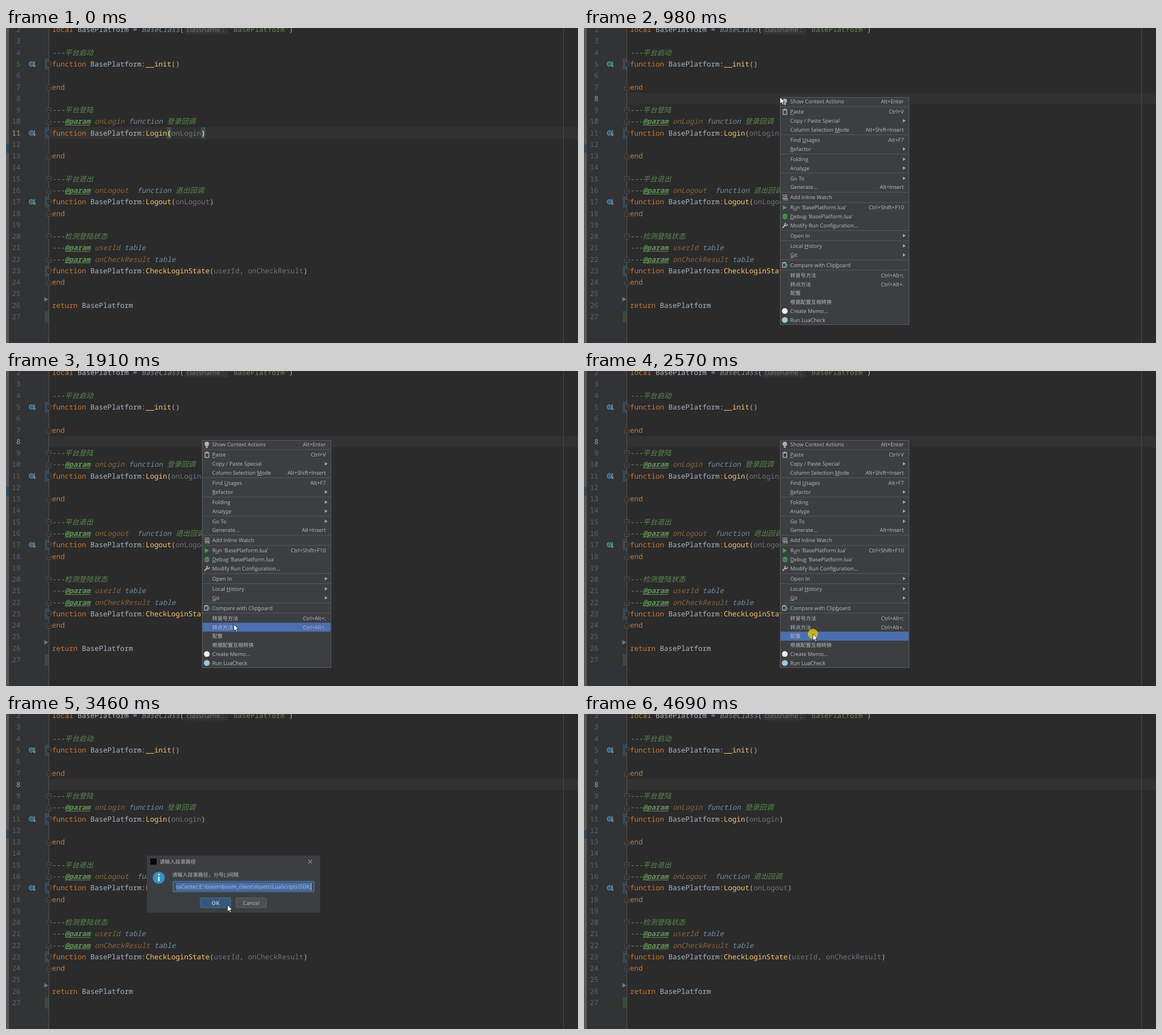
Recreate the animation shown at these times as an HTML page with a canvas. Size 1007 by 556 pixels, loop 5220 ms.

```html
<!DOCTYPE html>
<html lang="zh">
<head>
<meta charset="utf-8">
<style>
html, body { margin: 0; height: 100%; overflow: hidden; background: #2b2b2b; }
canvas { display: block; }
</style>
</head>
<body>
<canvas id="stage" width="1007" height="556"></canvas>
<script>
const c = document.getElementById('stage').getContext('2d');
const LOOP = 5220, COL = 7.5, ROW = 20.27;
const CJK = '"Noto Sans CJK SC", "Noto Sans CJK"';
const MONO = `12.5px "Noto Sans Mono", ${CJK}, monospace`;
const ui = (size = 9.4, weight = '') => `${weight} ${size}px "Open Sans", ${CJK}, sans-serif`;

// style letter: colour, font prefix
const STYLES = {
  k: ['#cc7832', ''], t: ['#a9b7c6', ''], f: ['#ffc66d', ''], p: ['#72737a', ''],
  c: ['#629755', 'italic '], z: ['#5b8a50', 'italic 300 '], a: ['#629755', 'italic bold '],
  n: ['#8a653b', 'italic '], y: ['#748ca3', 'italic '], i: ['#8290a0', 'italic '], s: ['#6a8759', '']
};
const METHOD = 'kfunction |tBasePlatform:|f';
const NOTE = 'c---|z';
const PARAM = 'c---|a@param|n ';
const CODE = {
  2: 'klocal |tBasePlatform = |iBaseClass|t(',
  4: NOTE + '平台启动', 5: METHOD + '__init|t()', 7: 'kend',
  9: NOTE + '平台登陆', 10: PARAM + 'onLogin |yfunction |z登录回调',
  11: METHOD + 'Login|t(|ponLogin|t)', 13: 'kend',
  15: NOTE + '平台退出', 16: PARAM + 'onLogout  |yfunction |z退出回调',
  17: METHOD + 'Logout|t(|ponLogout|t)', 18: 'kend',
  20: NOTE + '检测登陆状态', 21: PARAM + 'userId |ytable', 22: PARAM + 'onCheckResult |ytable',
  23: METHOD + 'CheckLoginState|t(|puserId|k, |ponCheckResult|t)', 24: 'kend',
  26: 'kreturn |tBasePlatform'
};

// "-" opens a new group, "&" marks the underlined letter, ">" a submenu
let menuY = 130;
const MENU = `Show Context Actions|Alt+Enter
-&Paste|Ctrl+V
Copy / Paste Special|>
Column Selection &Mode|Alt+Shift+Insert
-Find &Usages|Alt+F7
&Refactor|>
-Folding|>
Analy&ze|>
-Go To|>
Generate...|Alt+Insert
-Add Inline Watch|
-R&un 'BasePlatform.lua'|Ctrl+Shift+F10
&Debug 'BasePlatform.lua'|
Modify Run Configuration...|
-Open In|>
-Local &History|>
&Git|>
-Compare with Clip&board|
-转冒号方法|Ctrl+Alt+;
转点方法|Ctrl+Alt+.
配置|
根据配置互相转换|
Create Memo...|
Run LuaCheck|`.split('\n').map((row, i) => {
  const group = row[0] === '-';
  const [label, key] = row.slice(group ? 1 : 0).split('|');
  if (i) menuY += 15.8 + (group ? 2.2 : 0);
  return { label, key, group, y: menuY };
});

// mouse tip: time, x, y
const MOUSE = [
  [70, 944, 532], [140, 850, 452], [210, 705, 340], [280, 565, 235], [350, 455, 162],
  [420, 385, 128], [485, 352, 117], [550, 345, 122], [1375, 345, 122], [1440, 347, 160],
  [1510, 355, 250], [1578, 364, 316], [1640, 370, 335], [1710, 379, 372], [1780, 390, 412],
  [1850, 398, 445], [1910, 401, 447], [1980, 402, 455], [2045, 403, 462], [2110, 403, 464],
  [2640, 403, 464], [2710, 410, 463], [2850, 421, 460], [3040, 421, 460], [3110, 419, 446],
  [3250, 406, 390], [3390, 392, 345], [3460, 390, 337], [4062, 390, 337], [4130, 425, 350],
  [4200, 560, 388], [4268, 720, 428], [4336, 860, 460], [4404, 931, 474]
];
const HOVER_LAG = 60;

function box(x, y, w, h, fill) { c.fillStyle = fill; c.fillRect(x, y, w, h); }

function text(str, x, y, fill, font, align = 'left') {
  c.font = font; c.fillStyle = fill; c.textAlign = align;
  c.fillText(str, x, y);
}

function shape(points, fill, stroke, width = 1, open = false) {
  c.beginPath();
  points.forEach(([x, y]) => c.lineTo(x, y));
  if (!open) c.closePath();
  if (fill) { c.fillStyle = fill; c.fill(); }
  if (stroke) { c.strokeStyle = stroke; c.lineWidth = width; c.stroke(); }
}

function line(x1, y1, x2, y2, color, width = 1) {
  shape([[x1, y1], [x2, y2]], null, color, width, true);
}

function disc(x, y, r, fill, stroke, width = 1) {
  c.beginPath(); c.arc(x, y, r, 0, 7);
  if (fill) { c.fillStyle = fill; c.fill(); }
  if (stroke) { c.strokeStyle = stroke; c.lineWidth = width; c.stroke(); }
}

function panel(x, y, w, h, r, fill, stroke, width = 1) {
  c.beginPath(); c.roundRect(x, y, w, h, r);
  c.fillStyle = fill; c.fill();
  c.strokeStyle = stroke; c.lineWidth = width; c.stroke();
}

const rowY = n => 63.6 + (n - 5) * ROW;

function codeLine(n) {
  const base = rowY(n) + 4.4;
  let x = 81;
  for (const token of CODE[n].split('|')) {
    const [color, prefix] = STYLES[token[0]], str = token.slice(1);
    text(str, x, base, color, prefix + MONO);
    if (token[0] === 'a') line(x, base + 2, x + str.length * COL, base + 2, color);
    x += str.length * COL;
  }
}

function fold(n, dir) {
  const y = rowY(n) + 0.7, w = 4;
  shape([[75.5 - w, y - 4.5 * dir], [75.5 + w, y - 4.5 * dir], [75.5 + w, y + 1.5 * dir],
    [75.5, y + 5 * dir], [75.5 - w, y + 1.5 * dir]], '#2b2b2b', '#5c5e60', 0.8);
  line(73.5, y - 0.7 * dir, 77.5, y - 0.7 * dir, '#6a6c6e', 0.8);
}

function overrideIcon(n) {
  const y = rowY(n);
  disc(44.6, y, 4.6, '#3f8fb8');
  disc(44.6, y, 2.1, '#3f8fb8', '#28373f', 1.2);
  line(50, y - 5, 50, y + 4.5, '#b4b8ba');
  shape([[47.8, y + 2.5], [50, y + 5], [52.2, y + 2.5]], null, '#b4b8ba', 1, true);
}

function editor(current, caret) {
  box(0, 0, 1007, 556, '#2b2b2b');
  box(5, 0, 71, 556, '#313335');
  box(0, 0, 5, 556, '#555759');
  box(0, 205, 5, 15, '#34495a');
  box(76, rowY(current) - 10, 931, ROW, '#323232');
  line(981.5, 0, 981.5, 556, '#484848');
  for (const n of [5, 11, 17, 23]) box(68, rowY(n) - 10, 8, ROW, '#374752');
  box(68, rowY(27) - 10, 8, ROW, '#384c38');
  line(75.5, 0, 75.5, 556, '#555555');

  for (let n = 2; n <= 27; n++) {
    text(n, 25.5, rowY(n) + 4.4, n === current ? '#a4a3a3' : '#606366', MONO, 'right');
    if (CODE[n]) codeLine(n);
  }
  panel(315, -8, 76, 19, 2, '#343434', '#343434');
  text('classname :', 318, 7, '#787878', ui(12.1));
  text('"BasePlatform"', 393, rowY(2) + 4.4, STYLES.s[0], MONO);
  text(')', 498, rowY(2) + 4.4, STYLES.t[0], MONO);

  [5, 9, 11, 15, 17, 20, 23].forEach(n => fold(n, 1));
  [7, 10, 13, 16, 18, 22, 24].forEach(n => fold(n, -1));
  [5, 11, 17].forEach(overrideIcon);
  shape([[67.5, 475], [74.5, 479], [67.5, 483]], '#76797b');

  if (current === 11) {
    for (const [ch, col] of [['(', 27], [')', 35]]) {
      box(81 + col * COL, rowY(11) - 10, COL, ROW, '#3b514d');
      text(ch, 81 + col * COL, rowY(11) + 4.4, '#ffef28', 'bold ' + MONO);
    }
  }
  if (caret) box(80.5, 116.5, 1.2, 16, '#bbbbbb');
}

function menuIcons() {
  const g = '#afb1b3', green = '#499c54', y = i => MENU[i].y;
  disc(353.5, y(0) - 1.2, 4, g);
  box(351.7, y(0) + 3, 3.6, 2.6, g);

  c.strokeStyle = g; c.lineWidth = 1.4;
  c.strokeRect(350.5, y(1) - 4, 6.5, 8.5);
  box(352, y(1) - 5.5, 3.6, 3, g);

  for (const d of [-4, -1.2, 1.6]) line(349.5, y(10) + d, 358, y(10) + d, g, 1.2);
  disc(352.5, y(10) + 3.6, 1.5, null, g);
  disc(357, y(10) + 3.6, 1.5, null, g);

  shape([[350, y(11) - 4.2], [357.5, y(11)], [350, y(11) + 4.2]], green);

  for (const d of [-3, 0, 3]) line(349, y(12) + d, 358.5, y(12) + d, green);
  c.beginPath(); c.ellipse(353.7, y(12), 3.3, 4.8, 0, 0, 7); c.fillStyle = green; c.fill();
  line(352, y(12) - 0.8, 355.4, y(12) - 0.8, '#3c3f41', 0.8);
  line(352, y(12) + 1.4, 355.4, y(12) + 1.4, '#3c3f41', 0.8);

  line(349.5, y(13) + 4, 355, y(13) - 1.5, g, 2.2);
  c.beginPath(); c.arc(355.8, y(13) - 2, 2.3, -0.2, 4.6); c.strokeStyle = g; c.lineWidth = 1.8; c.stroke();

  c.strokeStyle = g; c.lineWidth = 1.3;
  c.strokeRect(349.5, y(17) - 4, 6, 8);
  box(350.8, y(17) - 5.3, 3.4, 2.4, g);
  shape([[353, y(17) + 0.5], [358.5, y(17) + 0.5], [356, y(17) - 2]], null, '#3592c4', 1.4, true);
  line(353, y(17) + 3, 358, y(17) + 3, '#3592c4', 1.4);

  disc(353.5, y(22), 5, '#f0f0f0');
  disc(353.5, y(23), 5.2, '#9cc8dc');
}

function menu(pointerY) {
  const active = MENU.find(m => Math.abs(m.y - pointerY) <= 7.9);
  box(345, 122, 227.5, 402, '#3c3f41');
  c.strokeStyle = '#5a5d5f'; c.lineWidth = 1;
  c.strokeRect(345.5, 122.5, 226.5, 401);
  for (const m of MENU) {
    if (m.group) line(346, m.y - 9.1, 571.5, m.y - 9.1, '#55585a');
    if (m === active) box(346, m.y - 7.9, 225.5, 15.8, '#4b6eaf');
    const base = m.y + 3.3, font = ui(m.label > '一' ? 9.15 : 9.4);
    const mark = m.label.indexOf('&'), label = m.label.replace('&', '');
    text(label, 363, base, '#bbbbbb', font);
    if (mark >= 0) {
      const x = 363 + c.measureText(label.slice(0, mark)).width;
      line(x, base + 1.5, x + c.measureText(label[mark]).width, base + 1.5, '#bbbbbb', 0.8);
    }
    if (m.key === '>') shape([[561.5, m.y - 3], [566, m.y], [561.5, m.y + 3]], '#afb1b3');
    else text(m.key, 563, base, '#bbbbbb', ui(), 'right');
  }
  menuIcons();
}

function dialog(alpha, scale, focused) {
  const fg = '#bbbbbb';
  c.save();
  c.globalAlpha = alpha;
  c.translate(400.5, 300); c.scale(scale, scale); c.translate(-400.5, -300);
  box(248, 250, 305, 100.5, '#3c3f41');
  box(254, 255, 11, 11, '#08090c');
  text('请输入目录路径', 270.5, 264.3, fg, ui(9.1));
  line(532, 257, 539, 264, fg);
  line(539, 257, 532, 264, fg);

  disc(269, 289, 10.6, '#3592c4');
  box(267.7, 287, 2.8, 8.2, '#e4eef3');
  disc(269.1, 283.6, 1.7, '#e4eef3');
  text('请输入目录路径，分号(;)间隔', 292.5, 286.8, fg, ui(9.1));

  panel(294, 295.3, 248.5, 18.5, 1.5, '#45494a', focused ? '#3d6185' : '#3c3f41', 2);
  c.strokeStyle = focused ? '#466d94' : '#646464'; c.lineWidth = 1;
  c.strokeRect(295.3, 296.6, 246, 16);
  if (focused) box(299, 298, 238.5, 13.5, '#4b6eaf');
  c.save();
  c.beginPath(); c.rect(299, 297, 239, 16); c.clip();
  text('DataCenter;E:\\boom\\boom_client\\Assets\\LuaScripts\\SDK;', 537, 307.6, fg, ui(9.35), 'right');
  c.restore();
  if (focused) box(537, 298, 1, 13.5, fg);

  panel(342, 324.5, 53.5, 17.5, 2, '#365880', focused ? '#4c708c' : '#43688c', focused ? 1 : 2);
  text('OK', 368.8, 336.8, fg, ui(9.4, 'bold'), 'center');
  panel(405, 324.5, 53.5, 17.5, 2, '#4c5052', '#5e6060');
  text('Cancel', 431.8, 336.8, fg, ui(), 'center');
  c.restore();
}

function pointer(x, y, halo) {
  if (halo) disc(x, y, 9, 'rgba(226,198,14,.8)');
  shape([[0, 0], [0, 11.8], [2.7, 9.4], [4.7, 13.6], [6.6, 12.7], [4.7, 8.7], [8.2, 8.5]]
    .map(([dx, dy]) => [x + dx, y + dy]), '#ffffff', '#111111', 0.8);
}

function mouseAt(t) {
  let i = MOUSE.length - 1;
  while (i > 0 && MOUSE[i][0] > t) i--;
  const [t0, x0, y0] = MOUSE[i], [t1, x1, y1] = MOUSE[i + 1] || [Infinity, x0, y0];
  if (t1 === Infinity) return [x0, y0];
  const steps = Math.max(1, Math.round((t1 - t0) / 69));
  const k = Math.floor((t - t0) / (t1 - t0) * steps) / steps;
  return [x0 + (x1 - x0) * k, y0 + (y1 - y0) * k];
}

function draw(t) {
  const during = (a, b) => t >= a && t < b;
  editor(t < 690 ? 11 : 8, during(690, 980) || during(4190, 4690));
  if (during(980, 2710)) menu(t < 1510 ? 0 : mouseAt(t - HOVER_LAG)[1]);
  if (during(2780, 2850)) dialog(0.45, 0.97, true);
  else if (during(2850, 2920)) dialog(0.87, 0.994, true);
  else if (during(2920, 4130)) dialog(1, 1, t < 3660);
  else if (during(4130, 4200)) dialog(0.5, 0.97, false);
  if (during(70, 4470)) {
    const [x, y] = mouseAt(t);
    pointer(x, y, during(620, 760) || during(2570, 2710) || during(3600, 3730));
  }
}

c.textRendering = 'geometricPrecision';
const start = performance.now();
function tick() {
  draw((performance.now() - start) % LOOP);
  requestAnimationFrame(tick);
}
tick();
</script>
</body>
</html>
```
